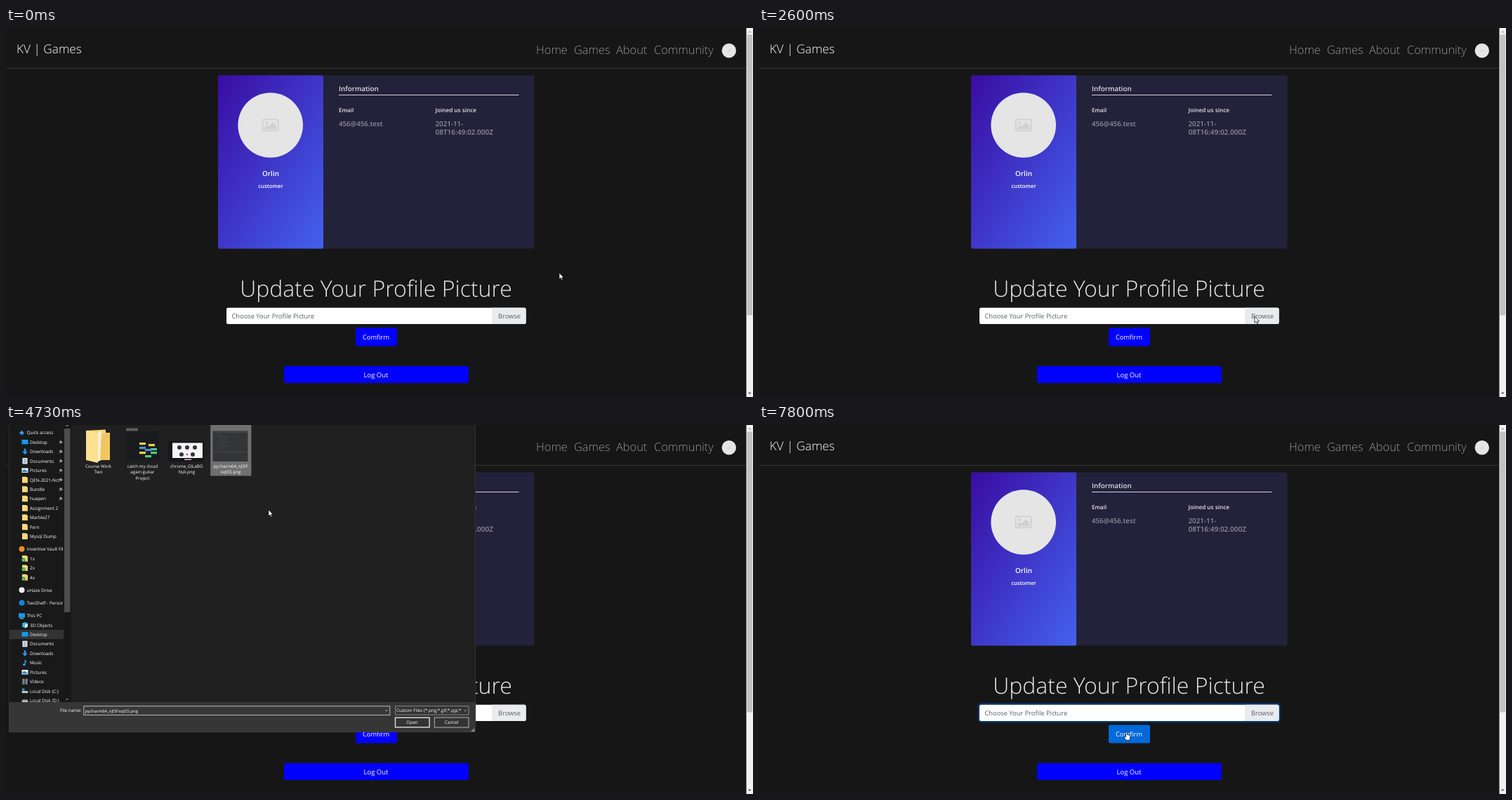
These frames come from a looping animation (1064 by 526 pixels, 8 s). An HTML page:

```html
<!DOCTYPE html>
<html lang="en">
<head>
<meta charset="utf-8">
<title>Profile picture upload</title>
<style>
html, body { margin: 0; height: 100%; overflow: hidden; background: #161616; }
svg { display: block; width: 1064px; height: 526px; font-family: "Open Sans", "Noto Sans", sans-serif; cursor: default; }
text { white-space: pre; text-rendering: geometricPrecision; }
</style>
</head>
<body>
<svg id="stage" viewBox="0 0 1064 526"></svg>
<script>
const LOOP = 8000, TICK = 1000 / 15;

const rect = (x, y, w, h, fill, more = '') =>
  `<rect x="${x}" y="${y}" width="${w}" height="${h}" fill="${fill}" ${more}/>`;
const circle = (x, y, r, fill, more = '') =>
  `<circle cx="${x}" cy="${y}" r="${r}" fill="${fill}" ${more}/>`;
const path = (d, fill, more = '') => `<path d="${d}" fill="${fill}" ${more}/>`;
const line = (d, color, w = 1) => path(d, 'none', `stroke="${color}" stroke-width="${w}"`);
const text = (x, y, s, size, fill = '#fff', more = '') =>
  `<text x="${x}" y="${y}" font-size="${size}" fill="${fill}" ${more}>${s}</text>`;
const group = (content, more = '') => `<g ${more}>${content}</g>`;
const at = (x, y, content) => group(content, `transform="translate(${x} ${y})"`);
const LIGHT = 'font-weight="300"', SEMI = 'font-weight="600"', MID = 'text-anchor="middle"';

// ---- web page ----
const pictureIcon = rect(-11, -8, 22, 16, 'none', 'rx="2" stroke="#cfd1d3" stroke-width="1.8"') +
  circle(-5.5, -3, 2, '#cfd1d3') + path('M-8.5 6V3L-5.5 0L-3 2.5L3.5 -4L8.5 1V6Z', '#cfd1d3');

const header = text(15, 36.3, 'KV | Games', 17.3, '#fff', LIGHT) +
  [[755, 'Home'], [809, 'Games'], [869, 'About'], [923, 'Community']]
    .map(([x, s]) => text(x, 36.6, s, 16.4, '#949494', LIGHT)).join('') +
  circle(1029.8, 32.3, 10.2, '#e5e5e5') + rect(1027.6, 31, 4.5, 3, '#dadada') +
  rect(0, 57, 1054.5, 1, '#343434');

const card = rect(302, 67.5, 450.5, 247, '#22223b', 'rx="2.5"') +
  rect(302, 67.5, 150, 247, 'url(#violet)', 'rx="2"') +
  circle(376.7, 138.5, 46.3, '#e5e5e5') + at(376.7, 138.3, pictureIcon) +
  text(377, 210.5, 'Orlin', 9.9, '#fff', MID + ' ' + SEMI) +
  text(377, 228, 'customer', 7.8, '#fff', MID + ' ' + SEMI) +
  text(474, 89.7, 'Information', 9.8, '#dfdfe4', SEMI) + rect(474, 95, 256.5, 1, '#d5d5da') +
  text(474, 119.5, 'Email', 8, '#e6e6ea', SEMI) +
  text(611.5, 119.5, 'Joined us since', 8.2, '#e6e6ea', SEMI) +
  text(474, 139.7, '456@456.test', 9.7, '#8f8f9b', SEMI) +
  text(611.5, 139.7, '2021-11-', 9.8, '#8f8f9b', SEMI) +
  text(611.5, 152, '08T16:49:02.000Z', 10, '#8f8f9b', SEMI);

const form = text(527, 383, 'Update Your Profile Picture', 32, '#e9e9e9', MID + ' ' + LIGHT) +
  rect(312.8, 397.4, 429, 25.8, 'none', 'id="glow" rx="3.5" stroke="#04356f" stroke-width="2.2"') +
  rect(314, 398.7, 426.6, 23.4, '#fff', 'rx="2.3"') +
  path('M693.2 398.7H738.3Q740.6 398.7 740.6 401V419.8Q740.6 422.1 738.3 422.1H693.2Z', '#e9ecef') +
  rect(692.8, 398.7, 0.7, 23.4, '#ced4da') +
  text(321.5, 414.2, 'Choose Your Profile Picture', 9.3, '#5a6067') +
  text(717, 414.2, 'Browse', 9.3, '#5a6067', MID) +
  rect(498, 427.5, 59, 26, '#00f', 'id="confirm" rx="2.3"') +
  text(527, 444, 'Comfirm', 9.3, '#fff', MID) +
  rect(396, 482, 263, 24, '#00f', 'rx="1.5"') +
  text(527, 498, 'Log Out', 9.5, '#fff', MID);

const scrollbar = rect(1054.5, 0, 9.5, 526, '#f1f1f1') + rect(1055.5, 9.5, 7.5, 400, '#c1c1c1') +
  path('M1057 6.5H1061.6L1059.3 4Z', '#a3a3a3') + path('M1057 519.5H1061.6L1059.3 522Z', '#505050');

// ---- file dialog: sidebar ----
const folder = path('M-4 -4.3H2.5V-3H4V4.3H-4Z', '#ffd977') + rect(2, -1, 2, 5.3, '#f6cb5c');
const screen = rect(-4.5, -3.5, 9, 6.5, '#1597ee');
const icons = {
  star: path('M0 -4L1.2 -1.2L4 -1L1.8 .8L2.6 3.6L0 2L-2.6 3.6L-1.8 .8L-4 -1L-1.2 -1.2Z', '#39a3f4'),
  folder,
  synced: folder + circle(-2, 2, 2.7, '#21a43a') + line('M-3.4 2L-2.3 3.1L-.7 1', '#fff', .8),
  desktop: screen,
  pc: screen + rect(-2.5, 3.6, 5, 1, '#b9d7ec'),
  down: path('M-1.4 -4.2H1.4V0H4L0 4.3L-4 0H-1.4Z', '#2f8fe3'),
  doc: rect(-3.5, -4.3, 7, 8.6, '#e4edf4') + line('M-2 -2H2M-2 0H2M-2 2H2', '#5b87a8', .9),
  picture: rect(-4.5, -3.3, 9, 6.6, '#e9f2f8') + path('M-3.5 2.3V0L-1 -1.5L3.5 1V2.3Z', '#2a7fc0'),
  cube: path('M0 -4.4L4 -2.4V2.4L0 4.4L-4 2.4V-2.4Z', '#35b5d8') + path('M0 -.4L4 -2.4V2.4L0 4.4Z', '#d5f2f8'),
  music: circle(-1.2, 2.6, 1.8, '#2fa0f0') + line('M.2 2.6V-4Q.6 -2 2.8 -.6', '#2fa0f0', 1.2),
  video: rect(-3.6, -4, 7.2, 8, '#586069') + line('M-2.7 -4V4M2.7 -4V4', '#ccd3d9', .7),
  disk: rect(-4.3, 0, 8.6, 3, '#c4c8cb') + path('M-3.2 -1.6H3.2L4.3 0H-4.3Z', '#83888c'),
  system: rect(-4.3, 0, 8.6, 3, '#c4c8cb') + rect(-4, -3.5, 3.4, 2.8, '#27a5e8'),
  orange: circle(0, 0, 4, '#f08a2c'),
  white: circle(0, 0, 4, '#eef4fb'),
  blue: circle(0, 0, 4, '#1684d8'),
};
// Each line is one spaced group: "icon:label" entries, the first one outdented.
const places = [
  'star:Quick access,desktop:Desktop,down:Downloads,doc:Documents,picture:Pictures,folder:QEN-2021-Nct,' +
    'folder:Bundle,folder:huapen,folder:Assignment 2,folder:Marble27,folder:Fern,folder:Mysql Dump',
  'orange:Inventive Vault Fil,synced:1x,synced:2x,synced:4x',
  'white:uHaze Drive',
  'blue:TwoShelf - Persor',
  'pc:This PC,cube:3D Objects,desktop:Desktop,doc:Documents,down:Downloads,music:Music,picture:Pictures,' +
    'video:Videos,system:Local Disk (C:),disk:Local Disk (D:),disk:Local Disk (E:),disk:My Crate (F:)',
];
const pin = path('M-.5 -3L3 .5L1.6 .8L.6 2.4L-2.4 -.6L-.8 -1.6Z', '#9a9a9a') + line('M-1 1L-2.8 2.8', '#9a9a9a', .7);
let row = 0;
const sidebarList = rect(5, 292, 77.5, 13.2, '#333') + places.map((names, g) =>
  names.split(',').map((entry, i) => {
    const [icon, label] = entry.split(':', 2), y = 11 + 13.42 * row++ + 4.8 * g;
    return at(i ? 27 : 22.5, y, icons[icon]) +
      text(i ? 34 : 29.5, y + 2.4, entry.slice(icon.length + 1), 6.4) +
      (g === 0 && i > 0 && i < 8 ? at(78, y, pin) : '');
  }).join('')).join('');

// ---- file dialog: files ----
const thumbs = [
  path('M114 8L142 6.5V11H148V50H114Z', '#f7d374') + path('M131 10L136 8V50L131 52Z', '#f4eedb') +
    path('M136 12H148V50H134Z', '#f0c661') + path('M114 8L131 11V54L114 50Z', '#ffe08f'),
  rect(171, 9, 47, 42, '#1a1b1e') + rect(171, 4.5, 17, 4, '#5c5d60') +
    [[190, 25, '#f2d14b'], [190, 31, '#4d8fe0'], [203, 27, '#f2d14b'], [206, 33, '#4fc3a1'], [190, 38, '#f2d14b'],
      [198, 34, '#4d8fe0'], [206, 38, '#58c878'], [198, 43, '#58c878']].map(([x, y, c]) => rect(x, y, 9, 3.2, c)).join(''),
  rect(231, 23, 51, 29, '#17171a') + rect(237, 25.5, 43, 21.5, '#f5f5f5') +
    [[247, 32], [258, 32], [269, 32], [250, 42], [266, 42]].map(([x, y]) => circle(x, y, 3, '#34343a')).join('') +
    rect(254, 48.5, 10, 1.5, '#c9c9cc') + circle(258, 42, 1.3, '#d23c3c'),
  rect(294.5, 8.5, 50, 43.5, '#343537') + rect(294.5, 8.5, 50, 2.5, '#434446') +
    [...Array(7)].map((_, i) => rect(299 + i % 3 * 2, 14 + i * 3.3, 10 + i * 7 % 13, .7, '#45484b')).join('') +
    rect(294.5, 38, 50, .8, '#4a4c4e'),
];
const labels = [['Course Work', 'Two'], ['catch my cloud', 'again guitar', 'Project'],
  ['chrome_GILaBO', 'Nyli.png'], ['pycharm64_nJI5F', 'xqtS5.png']];
const itemX = i => 102.5 + 62.9 * i;
const files = labels.map((lines, i) =>
  rect(itemX(i), -4, 58.2, 76.5, 'none', `id="item${i}"`) + thumbs[i] +
  lines.map((s, k) => text(itemX(i) + 29, 60.7 + 8.4 * k, s, 6.2, '#fff', MID)).join('')).join('');

const chevron = (x, y, up = 1) => line(`M${x - 2} ${y - up}L${x} ${y + up}L${x + 2} ${y - up}`, '#bbb', .8);
const footer = rect(4, 395, 665, 43, '#363636') +
  text(107.5, 409.3, 'File name:', 6.4, '#fff', 'text-anchor="end"') +
  rect(110.8, 400.8, 436, 12.6, '#383838', 'stroke="#c8c8c8" stroke-width=".9"') + chevron(542, 407) +
  text(112.7, 409.5, 'pycharm64_nJI5FxqtS5.png', 6, '#fff', 'id="fileName"') +
  rect(113, 403, .8, 9, '#fff', 'id="caret"') +
  rect(554.4, 400.8, 104.6, 12.2, '#333', 'stroke="#9b9b9b" stroke-width=".8"') + chevron(654, 407) +
  text(556, 409.3, 'Custom Files (*.png;*.gif;*.pjp;*', 6.3) +
  rect(554.5, 417.2, 48.6, 13.6, '#333', 'id="open" stroke="#ececec" stroke-width="1.3"') +
  text(578.5, 426.3, 'Open', 6.4, '#fff', MID) +
  rect(610.3, 417, 48.7, 14, '#333', 'stroke="#c4c4c4" stroke-width=".9"') +
  text(634.7, 426.3, 'Cancel', 6.4, '#fff', MID) +
  path('M667 432V437H662Z', '#8a8a8a');

const dialog = rect(4, -140, 665, 578, '#191919') + group(sidebarList, 'id="list"') +
  rect(82.5, -10, 10.5, 405, '#171717') + rect(83, 5, 8.5, 262, '#4d4d4d', 'id="thumb"') +
  chevron(87, 1, -1) + chevron(87, 391) +
  rect(93, -10, 576, 405, '#202020') + files + footer +
  rect(4.2, -140, 664.6, 577.8, 'none', 'stroke="#484848" stroke-width=".5"');

// ---- pointer ----
const outline = 'stroke="#000" stroke-width=".7" stroke-linejoin="round"';
const arrow = path('M0 0V9.2L2.1 7.3L3.5 10.6L5 10L3.6 6.8H6.5Z', '#fff', 'id="arrow" ' + outline);
const hand = path('M-1 .8Q0 -.5 1 .8V4L4 4.6Q5.5 5 5.4 6.5L4.6 11.8H-.8L-3.4 7.6Q-3.4 6 -2 6.6L-1 7.6Z',
  '#fff', 'id="hand" ' + outline);

const stage = document.getElementById('stage');
stage.innerHTML =
  `<linearGradient id="violet" x2="1" y2="1"><stop stop-color="#3a0ca3"/><stop offset="1" stop-color="#4361ee"/></linearGradient>` +
  rect(0, 0, 1064, 526, '#161616') + header + card + form + scrollbar +
  group(dialog, 'id="dialog"') + group(arrow + hand, 'id="pointer"');

const el = {};
stage.querySelectorAll('[id]').forEach(node => el[node.id] = node);
const set = (id, name, value) => el[id].setAttribute(name, value);
const show = (id, on) => set(id, 'visibility', on ? 'inherit' : 'hidden');

// ---- motion: time, x, y of the pointer tip ----
const route = [
  [530, 788, 349], [800, 700, 385], [1065, 567, 424], [1130, 543, 430], [1270, 527, 441], [1400, 528, 455],
  [1500, 533, 454], [1800, 612, 438], [2200, 706, 411], [2800, 706, 411], [3130, 611, 398], [3370, 430, 235],
  [3600, 252, 76], [3780, 290, 46], [3930, 318, 40], [4560, 318, 40], [5000, 460, 245], [5400, 577, 413],
  [5600, 637, 407], [5930, 579, 421], [6070, 579.5, 423], [7467, 579.5, 423], [7640, 552, 430], [7800, 523.5, 437.5],
];
function tip(t) {
  const next = route.findIndex(p => p[0] > t);
  if (next <= 0) return (next ? route[route.length - 1] : route[0]).slice(1);
  const [t0, x0, y0] = route[next - 1], [t1, x1, y1] = route[next], k = (t - t0) / (t1 - t0);
  return [x0 + (x1 - x0) * k, y0 + (y1 - y0) * k];
}
const inside = ([x, y], left, top, right, bottom) => x >= left && x <= right && y >= top && y <= bottom;
const onConfirm = t => inside(tip(t), 498, 427.5, 557, 453.5);
const clamp = v => Math.min(1, Math.max(0, v));

function draw(t) {
  const pos = tip(t);
  const opening = clamp((t - 2690) / 137), closing = clamp((t - 6430) / 150);
  const alpha = opening * (1 - closing), scale = 1 - .05 * (1 - alpha);
  show('dialog', alpha > 0);
  set('dialog', 'opacity', alpha);
  set('dialog', 'transform', `translate(336.5 150) scale(${scale}) translate(-336.5 -150)`);

  const scrolled = t < 2860, selected = t > 4595;
  set('list', 'transform', `translate(0 ${scrolled ? -36 : 0})`);
  set('thumb', 'y', scrolled ? 25 : 5);
  show('fileName', selected);
  show('caret', !selected && Math.floor((t - 2740) / 530) % 2 === 0);
  labels.forEach((_, i) => {
    const hover = inside(pos, itemX(i), 0, itemX(i) + 58, 72);
    set('item' + i, 'fill', selected && i === 3 ? '#707070' : hover ? '#4d4d4d' : 'none');
  });
  set('open', 'fill', inside(pos, 554, 417, 603, 431) ? '#454545' : '#333');

  const clicked = t > 2700 && t < 2780 ? .4 : 0;
  set('glow', 'opacity', Math.max(clicked, clamp((t - 6530) / 190)));
  const hot = (onConfirm(t - TICK) + onConfirm(t - 2 * TICK)) / 2;
  set('confirm', 'fill', `rgb(0,${105 * hot},${255 - 38 * hot})`);

  const pointing = onConfirm(t);
  show('hand', pointing);
  show('arrow', !pointing);
  set('pointer', 'transform', `translate(${pos})`);
}

function frame(now) {
  draw(Math.floor((now % LOOP + 4) / TICK) * TICK);
  requestAnimationFrame(frame);
}
frame(performance.now());
</script>
</body>
</html>
```
